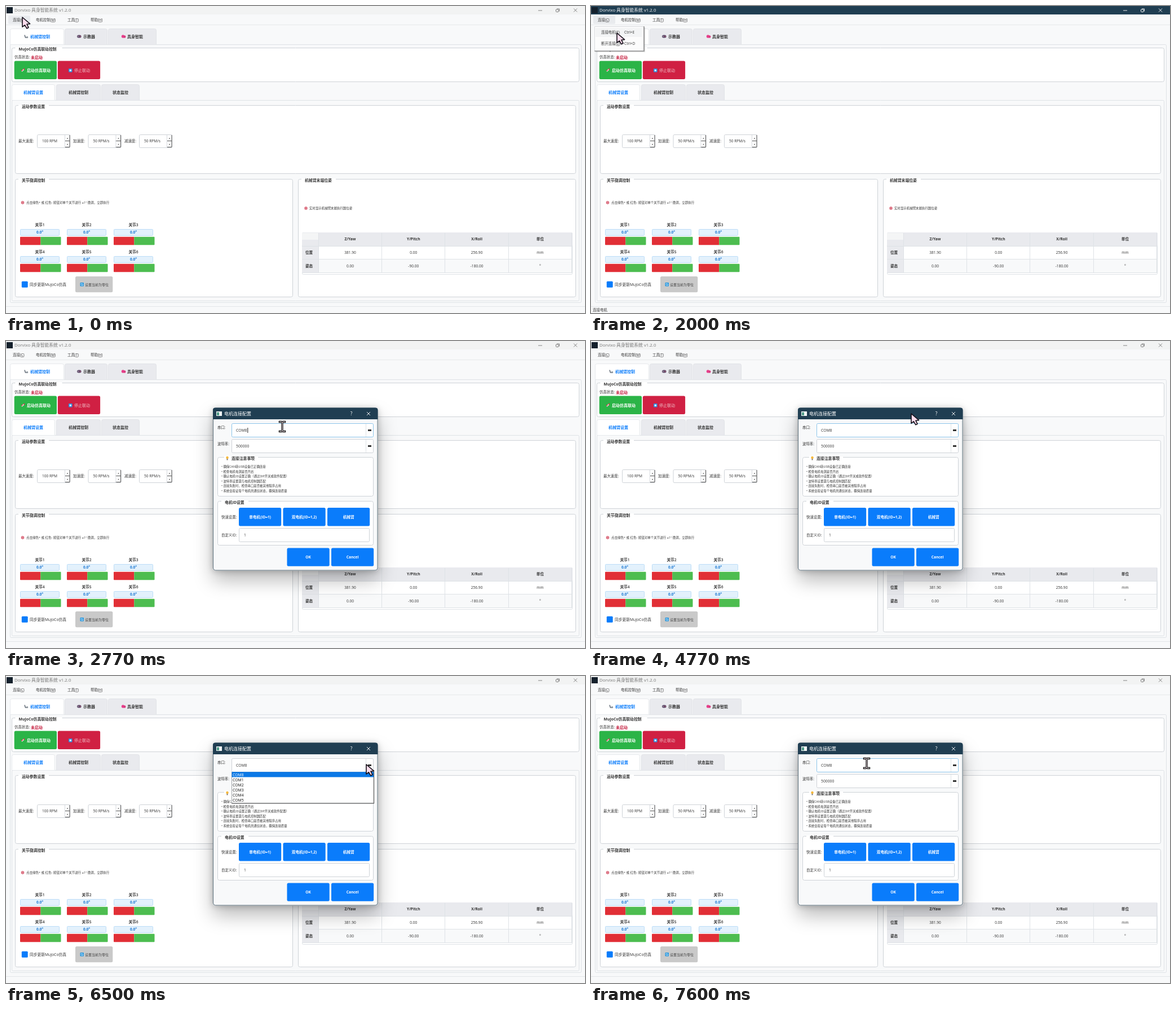
Recreate the animation shown at these times as an HTML page with a canvas. Size 1027x545 px, loop 8 s.

```html
<!DOCTYPE html>
<html lang="zh-CN">
<head>
<meta charset="utf-8">
<style>
html, body { margin: 0; width: 100%; height: 100%; overflow: hidden; background: #f8f9fa; }
canvas { display: block; }
</style>
</head>
<body>
<canvas id="stage" width="1027" height="545"></canvas>
<script>
const g = document.getElementById('stage').getContext('2d');
const LOOP = 8000;
const BG = '#f8f9fa', LINE = '#dee2e6', EDGE = '#ced2d7', TAB = '#e9eaee', INK = '#333',
      BLUE = '#0a7cfb', NAVY = '#203e52';
const FONT = '"Open Sans", "Noto Sans CJK SC", "Noto Sans CJK", sans-serif';

const clamp = v => Math.max(0, Math.min(1, v));
const ramp = (t, a, b) => clamp((t - a) / (b - a));
const easeOut = p => 1 - (1 - p) ** 3;
const easeInOut = p => p * p * (3 - 2 * p);

function rect(x, y, w, h, fill, stroke, r = 0) {
  g.beginPath();
  const o = stroke ? .5 : 0;
  g.roundRect(x + o, y + o, w - 2 * o, h - 2 * o, r);
  if (fill) { g.fillStyle = fill; g.fill(); }
  if (stroke) { g.strokeStyle = stroke; g.lineWidth = 1; g.stroke(); }
}
function lines(color, width, ...paths) {
  g.strokeStyle = color;
  g.lineWidth = width;
  g.beginPath();
  for (const p of paths)
    for (let i = 0; i < p.length; i += 2) g[i ? 'lineTo' : 'moveTo'](p[i], p[i + 1]);
  g.stroke();
}
function dot(x, y, r, color) {
  g.fillStyle = color;
  g.beginPath();
  g.arc(x, y, r, 0, 7);
  g.fill();
}
function text(s, x, y, size = 6.4, color = INK, weight = 400, align = 'left') {
  g.font = `${weight} ${size}px ${FONT}`;
  g.textAlign = align;
  g.fillStyle = color;
  g.fillText(s, x, y + size * .37);
}
const bold = (s, x, y, size = 7, color = INK, align) => text(s, x, y, size, color, 700, align);

// Label ending in "(X)" with its shortcut letter underlined
function mnemonic(s, x, y) {
  text(s, x, y);
  const from = x + g.measureText(s.slice(0, -2)).width;
  const w = g.measureText(s.at(-2)).width;
  rect(from, y + 3.4, w, .6, INK);
}
function group(x, y, w, h, title, tx, tw) {
  rect(x, y, w, h, '#fff', EDGE, 3);
  rect(tx - 6, y - 1, tw + 12, 3, '#fff');
  bold(title, tx, y + 2.5, 6.85);
}
function tab(x, y, w, label, tx, active) {
  rect(x, y, w, 29, active ? '#fff' : TAB, active ? '#e6e9ec' : '#e1e3e7', [3, 3, 0, 0]);
  bold(label, tx, y + 14, 7, active ? BLUE : INK);
}
function button(x, y, w, h, label, color = BLUE) {
  rect(x, y, w, h, color, null, 2.5);
  bold(label, x + w / 2, y + h / 2, 6.6, '#fff', 'center');
}
function cross(x, y, color) {
  lines(color, .9, [x - 3, y - 3, x + 3, y + 3], [x + 3, y - 3, x - 3, y + 3]);
}
function target(x, y) {
  dot(x, y, 2.7, '#d4455c');
  dot(x, y, 1.8, '#f6dfe3');
  dot(x, y, 1.1, '#cc3850');
}
function spin(label, lx, x, value) {
  text(label, lx, 240);
  rect(x, 228, 59, 24, '#fff', EDGE, 2);
  text(value, x + 9, 240, 6.6);
  lines('#555', 1, [x + 58, 229, x + 58, 250.5, x + 49, 250.5], [x + 49, 239.5, x + 58, 239.5]);
  lines('#d5d8dc', 1, [x + 49.5, 229, x + 49.5, 251]);
  for (const y of [234.5, 245]) rect(x + 53.2, y, 1.6, 1.2, '#333');
}

function titleBar(active) {
  rect(0, 0, 1027, 15, '#f2f3f3');
  g.globalAlpha = active;
  rect(0, 0, 1027, 15, NAVY);
  g.globalAlpha = 1;
  const ink = active > .5 ? '#fff' : '#777';
  rect(1, 2, 11, 11, '#14202c');
  text('Dorvixo 具身智能系统 v1.2.0', 15, 7.5, 7.8, ink);
  lines(ink, .9, [944, 8, 951, 8], [977, 5, 981.5, 5, 981.5, 9.5]);
  rect(975, 5.5, 5.5, 5.5, null, ink, 1);
  cross(1010, 7.5, ink);
}

function menuBar(hover) {
  if (hover) rect(4, 17, 39, 15, '#e9ebee', null, 2);
  mnemonic('连接(C)', 12, 24.5);
  mnemonic('电机控制(M)', 53, 24.5);
  mnemonic('工具(T)', 109, 24.5);
  mnemonic('帮助(H)', 150, 24.5);
  rect(0, 33, 1027, 1, '#e6e8eb');
}

function tabsAndSimulation() {
  rect(7, 68, 1014, 459, BG, LINE, 2);
  tab(7, 40, 96, '机械臂控制', 43, true);
  tab(104, 40, 76, '示教器', 137);
  tab(181, 40, 86, '具身智能', 215);
  lines('#6d7680', 1.7, [33, 51.5, 34.5, 56, 38.5, 56]);
  dot(37.5, 55.5, 1.7, '#8f979f');
  rect(126, 51.5, 7.5, 5, '#5d4868', null, 2.5);
  dot(128, 54, .8, '#ddd');
  dot(131.5, 54, .8, '#e06a7c');
  dot(207.5, 54, 2.7, '#e7408c');
  dot(210.3, 54.5, 2.2, '#dc3b80');

  group(10, 74, 1007, 61, 'MuJoCo仿真联动控制', 22.5, 71);
  text('仿真状态:', 15, 91);
  bold('未启动', 44, 91, 7, '#c51f3f');
  rect(14.7, 97.6, 75.3, 32.3, '#2bb447', null, 2.5);
  rect(91.8, 97.6, 75.3, 32.3, '#d02043', null, 2.5);
  lines('#f1e6e8', 2.2, [28, 116, 32, 112]);
  dot(32, 112, 1.2, '#d83a4c');
  dot(28.5, 114, 1.2, '#c83b48');
  bold('启动仿真联动', 37, 114, 7, '#fff');
  rect(111, 111, 6.5, 6.5, '#2f8fe0', null, 1);
  rect(112.8, 112.8, 3, 3, '#fff');
  text('停止联动', 121, 114, 7, '#f0c3cb', 500);
}

function armSettings() {
  rect(10, 167, 1007, 357, BG, LINE, 2);
  tab(10, 139, 77, '机械臂设置', 31, true);
  tab(89, 139, 79, '机械臂控制', 111);
  tab(169, 139, 68, '状态监控', 189);

  group(16, 176, 995, 122, '运动参数设置', 28, 42);
  spin('最大速度:', 22, 55, '100 RPM');
  spin('加速度:', 119, 145.5, '50 RPM/s');
  spin('减速度:', 210, 236, '50 RPM/s');

  group(16, 307, 493, 210, '关节微调控制', 28, 42);
  target(29.5, 349);
  text('点击绿色+ 或 红色- 按钮对单个关节进行 ±1° 微调，立即执行', 36, 349, 5.5);
  for (let i = 0; i < 6; i++) {
    const x = 25 + i % 3 * 83, y = i < 3 ? 389 : 437;
    text('关节' + (i + 1), x + 35, y, 6.7, INK, 600, 'center');
    rect(x, y + 7, 70, 12, '#e3f1fc', '#bcddf7', 1);
    bold('0.0°', x + 35, y + 13, 6.6, '#1976d2', 'center');
    rect(x, y + 20.8, 36.3, 14.5, '#e12f36', null, [1, 0, 0, 1]);
    rect(x + 36.3, y + 20.8, 36.2, 14.5, '#4dbd50', null, [0, 1, 1, 0]);
  }
  rect(27.8, 488.8, 10.9, 10.9, BLUE, null, 1.5);
  text('同步更新MuJoCo仿真', 42, 494.5, 6.75);
  rect(123, 480, 66.3, 28.2, '#c9c9c9', null, 2.5);
  rect(131.5, 491, 6.5, 6.5, '#2294dd', null, 1);
  lines('#fff', .8, [133, 494, 133, 493, 136.5, 493], [136.5, 494.5, 136.5, 495.7, 133, 495.7]);
  text('设置当前为零位', 140, 494.5, 6, '#444');
}

function poseTable() {
  group(518, 307, 493, 210, '机械臂末端位姿', 530, 49);
  target(532, 359);
  text('实时显示机械臂末端执行器位姿', 538, 359, 5.45);
  rect(525, 402, 480, 75, '#fff', LINE, 2);
  rect(525, 402, 480, 24, TAB, null, 2);
  rect(525, 403, 29, 12, '#f4f5f6');
  rect(525, 426, 30, 47, TAB);
  rect(555, 450, 449, 23, BG);
  for (const y of [426, 449, 473]) rect(525, y, 480, 1, LINE);
  for (const x of [554, 666, 778, 891, 1003]) rect(x, 403, 1, 70, LINE);
  const rows = [['Z/Yaw', 'Y/Pitch', 'X/Roll', '单位'],
                ['381.90', '0.00', '256.90', 'mm'],
                ['0.00', '-90.00', '-180.00', '°']];
  rows.forEach((row, r) => row.forEach((s, c) =>
    text(s, 610.5 + c * 112.3, [414, 438, 461.5][r], 6.6, INK, r ? 400 : 700, 'center')));
  text('位置', 531, 438, 6.6, INK, 600);
  text('姿态', 531, 461.5, 6.6, INK, 600);
}

function menu(hover) {
  rect(8, 38, 88, 44, 'rgba(0,0,0,.13)');
  rect(6, 36, 88, 44, '#fcfcfc', '#d8dadd');
  lines('#777', 1.2, [94, 36, 94, 80, 6, 80]);
  if (hover) rect(8, 39, 82, 16, '#f3f4f5');
  mnemonic('连接电机(E)', 18, 47);
  text('Ctrl+E', 59, 47, 6.6);
  mnemonic('断开连接(D)', 18, 67);
  text('Ctrl+D', 59, 67, 6.6);
}

function combo(y, value, edge) {
  rect(400, y, 252, 25, '#fff', edge, 2);
  rect(638, y + 1, 1, 23, '#dfe3e7');
  rect(642, y + 11, 6, 3, '#333');
  text(value, 408, y + 12.5, 6.8);
}

function shadow(blur, offset, alpha) {
  g.save();
  g.shadowColor = `rgba(0,0,0,${alpha})`;
  g.shadowBlur = blur;
  g.shadowOffsetY = offset;
  rect(367, 118.5, 292.5, 289, BG, null, 4);
  g.restore();
}

function dialog(focused, caret) {
  shadow(34, 17, .28);
  shadow(11, 1, .22);
  rect(367, 118.5, 292.5, 289, BG, '#596c79', 4);
  rect(367, 118.5, 292.5, 20.5, NAVY, null, [4, 4, 0, 0]);
  rect(373, 125, 10, 8, '#f3f6f7');
  rect(374, 126.5, 4, 5.5, '#4c9a86');
  text('电机连接配置', 387, 129, 8, '#fff');
  text('?', 612.5, 129, 8.5, '#fff', 400, 'center');
  cross(643, 129, '#fff');

  text('串口:', 375, 154);
  text('波特率:', 375, 182.5);
  combo(146, 'COM8', focused ? '#8cc4ea' : EDGE);
  combo(174, '500000', EDGE);
  if (caret) rect(428.3, 154, 1, 9, '#222');

  group(375, 206, 277, 70, '连接注意事项', 400, 41);
  rect(387, 204, 12, 5, '#fff');
  dot(392.5, 207, 2.3, '#f5b83d');
  rect(391.4, 209, 2.2, 2.5, '#8b8378');
  ['确保CAN转USB设备已正确连接', '检查电机电源是否开启', '确认电机ID设置正确（通过DIP开关或软件配置）',
   '波特率设置需与电机控制器匹配', '连接失败时，检查串口是否被其他程序占用',
   '系统会验证每个电机的通信状态，确保连接质量'
  ].forEach((s, i) => text('• ' + s, 382, 223 + i * 8.6, 5.4));

  group(375, 284, 277, 79, '电机ID设置', 388, 36);
  text('快速设置:', 382, 313);
  button(413, 296, 75.2, 32.4, '单电机(ID=1)');
  button(491.5, 296, 75.2, 32.4, '双电机(ID=1,2)');
  button(570, 296, 75.2, 32.4, '机械臂');
  text('自定义ID:', 382, 345);
  rect(413, 332, 232, 25, '#fff', EDGE, 2);
  text('1', 422, 345, 6.7);
  button(498.5, 367.4, 75.2, 32.4, 'OK');
  button(577, 367.4, 75.2, 32.4, 'Cancel');
}

function portList(open) {
  g.save();
  g.beginPath();
  g.rect(398, 170, 258, 58 * open);
  g.clip();
  rect(400, 170, 253, 56.5, '#fff', '#a0a4a8');
  lines('#555', 1.2, [652.5, 170, 652.5, 226, 400, 226]);
  rect(400.5, 170.3, 251.5, 9.2, '#0a78e6');
  [8, 1, 2, 3, 4, 5].forEach((n, i) => text('COM' + n, 402, 175 + i * 9.05, 6.9, i ? '#111' : '#fff'));
  g.restore();
}

// Pointer moves: start, end, x, y, easing; it rests between moves
const MOVES = [
  [0, 0, 29, 20],
  [930, 1130, 46, 48, easeInOut],
  [2170, 2770, 490, 152, easeInOut],
  [4770, 4770, 568, 129],
  [5000, 5200, 658, 163, easeOut],
  [5700, 5870, 643, 155, easeInOut],
  [6490, 6500, 639, 157],
  [6700, 7000, 497, 168, easeOut],
  [7170, 7170, 500, 153],
  [7500, 7600, 489, 155, easeOut]
];
function pointerAt(t) {
  let x = 0, y = 0;
  for (const [a, b, tx, ty, ease] of MOVES) {
    if (t < a) break;
    const p = ease ? ease(ramp(t, a, b)) : 1;
    x += (tx - x) * p;
    y += (ty - y) * p;
  }
  return [x, y];
}

const ARROW = new Path2D('M0 0V17.2L4.4 13.8 7.9 19.8 11 18.2 8 12.3 13.6 11.6Z');
const BEAM = new Path2D('M-4.5 -8.5H-1.5L0 -7.5 1.5 -8.5H4.5M0 -7.5V7.5M-4.5 8.5H-1.5L0 7.5 1.5 8.5H4.5');
function pointer(x, y, beam) {
  g.save();
  g.translate(x, y);
  if (beam) {
    g.strokeStyle = '#111';
    g.lineWidth = 3.4;
    g.lineCap = 'square';
    g.stroke(BEAM);
    g.strokeStyle = '#fbeaf3';
    g.lineWidth = 1;
    g.stroke(BEAM);
  } else {
    g.fillStyle = '#fbdcec';
    g.fill(ARROW);
    g.strokeStyle = '#15101a';
    g.lineWidth = 1.6;
    g.lineJoin = 'round';
    g.stroke(ARROW);
  }
  g.restore();
}

const CARET = [[2300, 3200], [3670, 4330], [5000, 5700], [7200, 7530]];

function draw(t) {
  const [x, y] = pointerAt(t);
  const menuIn = t < 2170 ? ramp(t, 30, 230) : 0;
  const dialogIn = easeOut(ramp(t, 2270, 2500));
  const listIn = t < 7170 ? ramp(t, 5760, 5930) : 0;
  const hovering = menuIn === 1 && t >= 1030;

  rect(0, 0, 1027, 545, BG);
  titleBar(ramp(t, 30, 130) * (1 - ramp(t, 2270, 2370)));
  menuBar(t < 2170);
  tabsAndSimulation();
  armSettings();
  poseTable();
  rect(0, 533, 1027, 1, '#e3e6e9');
  if (hovering) text('连接电机', 3, 539.5, 6.5);

  if (menuIn) {
    g.globalAlpha = menuIn;
    menu(hovering);
    g.globalAlpha = 1;
  }
  if (dialogIn) {
    g.save();
    g.globalAlpha = dialogIn;
    const s = .92 + .08 * dialogIn;
    g.translate(513 * (1 - s), 263 * (1 - s));
    g.scale(s, s);
    dialog(!listIn, CARET.some(([a, b]) => t >= a && t < b));
    g.restore();
  }
  if (listIn) portList(listIn);

  const overField = x > 400 && x < 638 && y > 146 && y < 171;
  pointer(x, y, overField && dialogIn && !listIn);
}

function tick() {
  draw(performance.now() % LOOP);
  requestAnimationFrame(tick);
}
tick();
</script>
</body>
</html>
```
